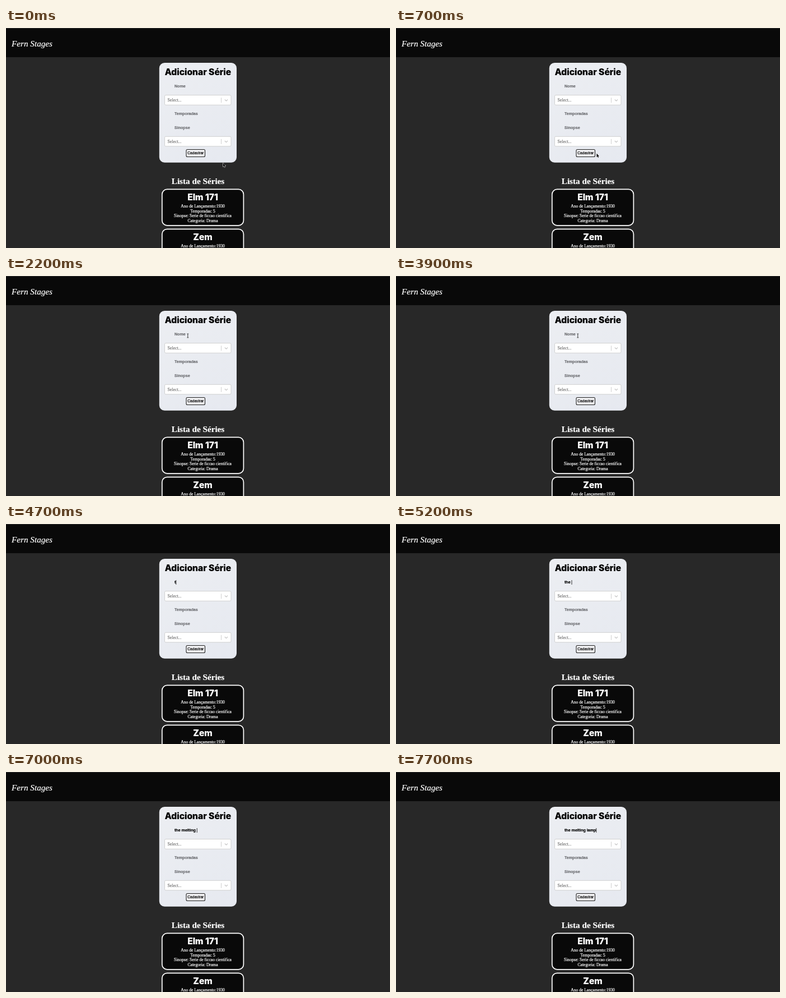
Write an HTML page with a canvas that moves like this. It is 686 px wide and 392 px high and loops after 8 s.

```html
<!DOCTYPE html>
<html lang="pt">
<head>
<meta charset="utf-8">
<style>
  html, body { margin: 0; width: 100%; height: 100%; overflow: hidden; background: #282828; }
  canvas { display: block; }
</style>
</head>
<body>
<canvas id="stage" width="686" height="392"></canvas>
<script>
const ctx = document.getElementById('stage').getContext('2d');
const LOOP = 8000, STEP = 100;
const ARIAL = '"Liberation Sans", Arial, sans-serif';
const TIMES = '"Liberation Serif", "Times New Roman", serif';
const HEADING = '800 15.6px Inter, sans-serif';
const INPUT = `bold 7.1px ${ARIAL}`;
const LABEL = '#6c6d71';

const TYPED = 'the melting lamp';
const KEY_TIMES = [4700, 4900, 5000, 5200, 5700, 5900, 6000, 6200,
                   6400, 6600, 6900, 7000, 7300, 7400, 7600, 7700];

// Pointer legs: start and end time, then the point reached.
const START = [387.8, 240.6];
const LEGS = [
  [200, 700, 358.5, 223.5],
  [1000, 1400, 329.8, 128.7],
  [1800, 2200, 324.8, 106.4]
];

// A hairline stroke gives the text its slightly heavier smoothing.
function text(str, x, y, font, color, align = 'left') {
  ctx.font = font;
  ctx.fillStyle = ctx.strokeStyle = color;
  ctx.textAlign = align;
  ctx.lineWidth = 0.2;
  ctx.lineJoin = 'round';
  ctx.fillText(str, x, y);
  ctx.strokeText(str, x, y);
}

function box(x, y, w, h, r, fill, stroke, line = 1) {
  ctx.beginPath();
  ctx.roundRect(x, y, w, h, r);
  ctx.fillStyle = fill;
  ctx.fill();
  if (!stroke) return;
  ctx.strokeStyle = stroke;
  ctx.lineWidth = line;
  ctx.stroke();
}

function polyline(points, color, width) {
  ctx.beginPath();
  points.forEach(([x, y]) => ctx.lineTo(x, y));
  ctx.strokeStyle = color;
  ctx.lineWidth = width;
  ctx.stroke();
}

function select(y, hover) {
  box(283.5, y, 118.5, 17.5, 2, '#fff', hover ? '#b3b3b3' : '#cccccc', 0.9);
  text('Select...', 288.5, y + 11.5, `7.8px ${TIMES}`, '#777');
  polyline([[384.5, y + 4.5], [384.5, y + 13.5]], '#ccc', 0.9);
  polyline([[390.8, y + 7.7], [393.4, y + 10.3], [396, y + 7.7]], '#c4c4c4', 1.1);
}

function seriesCard(y, title) {
  box(278.8, y, 145.6, 64.4, 9, '#090909', '#fff', 1.7);
  text(title, 351.5, y + 19.6, HEADING, '#fff', 'center');
  ['Ano de Lançamento:1930', 'Temporadas: 5',
   'Sinopse: Serie de ficcao cientifica', 'Categoria: Drama']
    .forEach((row, i) =>
      text(row, 351.5, y + 32.2 + i * 8.9, `7.57px ${TIMES}`, '#fff', 'center'));
}

function pointerAt(t) {
  let [x, y] = START;
  for (const [from, to, endX, endY] of LEGS) {
    if (t <= from) break;
    const p = Math.min(1, (t - from) / (to - from));
    const eased = p * p * (3 - 2 * p);
    x += (endX - x) * eased;
    y += (endY - y) * eased;
  }
  return [x, y];
}

function arrow(x, y) {
  const shape = [[0, 0], [0, 6.7], [1.5, 5.3], [2.5, 7.7], [3.5, 7.3], [2.5, 5], [4.6, 5]];
  ctx.beginPath();
  shape.forEach(([dx, dy]) => ctx.lineTo(x + dx, y + dy));
  ctx.closePath();
  ctx.strokeStyle = '#fff';
  ctx.lineWidth = 1;
  ctx.stroke();
  ctx.fillStyle = '#000';
  ctx.fill();
}

function textPointer(x, y) {
  polyline([[x, y - 3.2], [x, y + 3.2]], '#222', 0.9);
  for (const dy of [-3.4, 3.4])
    polyline([[x - 1.5, y + dy], [x + 1.5, y + dy]], '#222', 0.8);
}

function caretVisible(t, lastKey) {
  if (t < 2400) return false;
  if (lastKey) return t < 5500 || t >= 5700;
  return Math.floor((t - 2400) / 500) % 2 === 0;
}

function nameField(t) {
  const count = KEY_TIMES.filter(k => k <= t).length;
  const value = TYPED.slice(0, count);
  text(value || 'Nome', 301, 106.4, INPUT, value ? '#000' : LABEL);
  if (!caretVisible(t, count)) return;
  const x = 301.4 + (value ? ctx.measureText(value).width : 0);
  polyline([[x, 100], [x, 108]], '#000', 0.8);
}

function draw(t) {
  ctx.fillStyle = '#282828';
  ctx.fillRect(0, 0, 686, 392);
  ctx.fillStyle = '#090909';
  ctx.fillRect(0, 0, 686, 52);
  ctx.fillStyle = '#2c2c2c';
  ctx.fillRect(0, 0, 686, 1);
  text('Fern Stages', 10, 33, `italic 15.2px ${TIMES}`, '#fff');

  const card = ctx.createLinearGradient(274, 62, 412, 240);
  card.addColorStop(0, '#eceef2');
  card.addColorStop(1, '#e6e9f0');
  box(273.8, 61.9, 138.2, 177.8, 9.5, card);
  text('Adicionar Série', 343, 83.7, HEADING, '#000', 'center');

  const [x, y] = pointerAt(t);
  const overSelect = x > 283 && x < 402 && y > 119 && y < 138;
  nameField(t);
  select(119.7, overSelect);
  text('Temporadas', 301, 154.5, INPUT, LABEL);
  text('Sinopse', 301, 179.8, INPUT, LABEL);
  select(193.3, false);
  box(322, 216.5, 33.5, 13, 2, '#efeff1', '#222', 1.1);
  text('Cadastrar', 338.8, 225.3, `6.6px ${ARIAL}`, '#000', 'center');

  text('Lista de Séries', 343, 278, `bold 15.2px ${TIMES}`, '#fff', 'center');
  seriesCard(287.4, 'Elm 171');
  seriesCard(358.3, 'Zem');

  if (t >= KEY_TIMES[0]) return;
  if (y < 114) textPointer(x, y);
  else arrow(x, y);
}

function frame() {
  const t = performance.now() % LOOP;
  draw(Math.floor(t / STEP) * STEP);
  requestAnimationFrame(frame);
}
frame();
</script>
</body>
</html>
```
